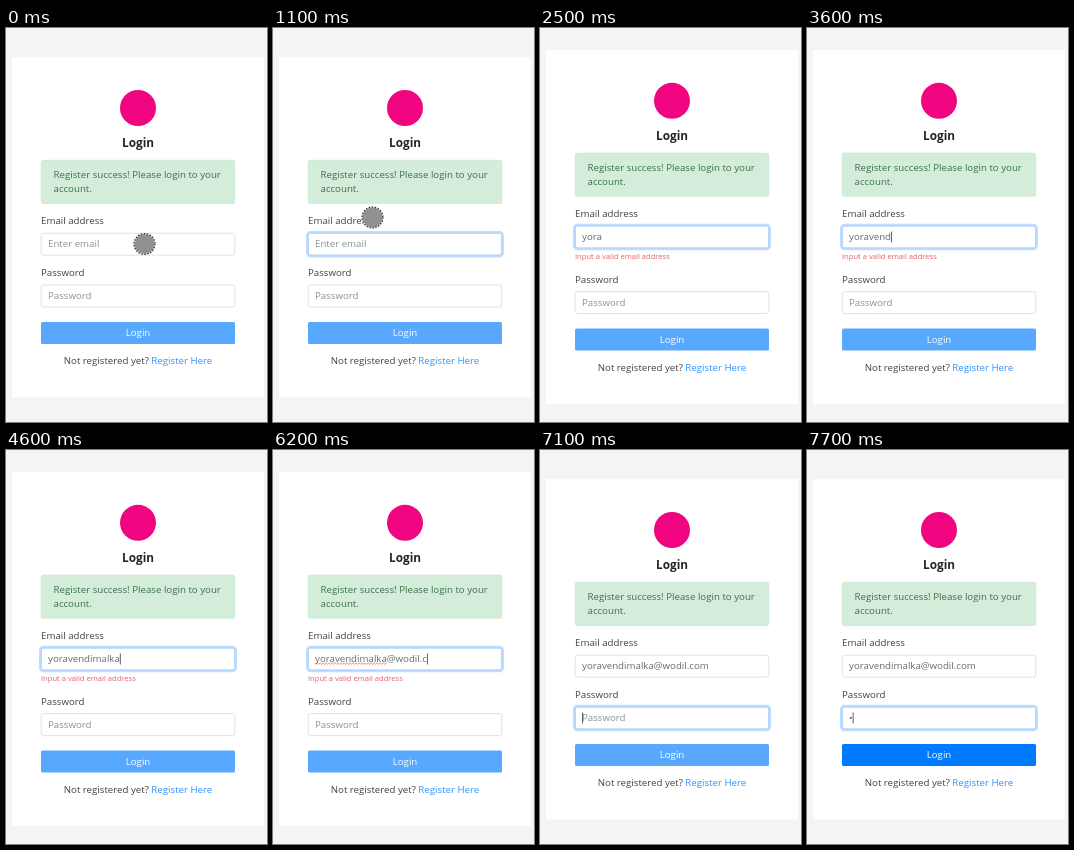
An HTML page that plays this animation: 261 px wide and 394 px high, repeating every 8000 ms.

```html
<!DOCTYPE html>
<html lang="en">
<head>
<meta charset="utf-8">
<title>Login</title>
<style>
html, body { margin: 0; height: 100%; overflow: hidden; background: #f4f4f4; }
svg { display: block; width: 100vw; height: 100vh; font: 9.7px "Open Sans", sans-serif; fill: #3f4347; }
.field { fill: #fff; stroke: #dfe2e6; }
.focus { fill: none; stroke: #a3cfff; }
.ring { fill: none; stroke: #bfdeff; stroke-width: 2; }
.hint { fill: #8b9299; }
.value { fill: #666c72; }
.caret { stroke: #343a40; stroke-width: .8; }
.mid { text-anchor: middle; }
</style>
</head>
<body>
<svg viewBox="0 0 261 394">
  <rect id="card" x="6" width="252" fill="#fff"/>
  <g id="upper">
    <circle cx="132" cy="80" r="18" fill="#f0047f"/>
    <text class="mid" x="132" y="119" font-size="11.8" font-weight="700" fill="#212529">Login</text>
    <rect x="35.2" y="132.3" width="193.6" height="43.2" rx="2" fill="#d4edda" stroke="#c8e8d0" stroke-width=".7"/>
    <text x="47.5" y="150" fill="#3a7148">Register success! Please login to your</text>
    <text x="47.5" y="164" fill="#3a7148">account.</text>
    <text x="35" y="196">Email address</text>
    <g id="email"></g>
    <path id="squiggle" fill="none" stroke="#e5484d" stroke-width=".7"/>
  </g>
  <text id="error" x="35" y="231" font-size="7.6" fill="#e4606d">Input a valid email address</text>
  <g id="lower">
    <text x="35" y="248">Password</text>
    <g id="password"></g>
    <g id="button">
      <rect x="35" y="294" width="194" height="22" rx="1.5" fill="#007bff"/>
      <text class="mid" x="132" y="308" fill="#fff">Login</text>
    </g>
    <text class="mid" x="132" y="336">Not registered yet? <tspan fill="#2e93ff">Register Here</tspan></text>
  </g>
  <g id="pointer">
    <circle r="10.6" fill="#919191" stroke="#e4e4e4" stroke-width="1.4"/>
    <circle r="10.4" fill="none" stroke="#222" stroke-width="1.2" stroke-dasharray="1.3 1.7"/>
  </g>
</svg>
<script>
const $ = id => document.getElementById(id);
const clamp = v => Math.max(0, Math.min(1, v));
const show = (el, on) => el.style.display = on ? '' : 'none';

const address = 'yoravendimalka@wodil.com';
// time at which each character of the address appears
const keys = [1400, 1600, 2000, 2100, 3200, 3300, 3400, 3600, 3800, 3900, 4000, 4200,
  4400, 4600, 5000, 5200, 5400, 5500, 5600, 5900, 6100, 6200, 6400, 6600];

function makeField(id, y, hint) {
  const g = $(id);
  g.innerHTML = `<rect class="field" x="35.2" y="${y}" width="193.6" height="22" rx="2.5"/>
    <g class="glow"><rect class="ring" x="34" y="${y - 1.2}" width="196" height="24.4" rx="3.5"/>
    <rect class="focus" x="35.2" y="${y}" width="193.6" height="22" rx="2.5"/></g>
    <text class="hint" x="42" y="${y + 14}">${hint}</text>
    <text class="value" x="42" y="${y + 14}"></text>
    <path class="caret" d="M42.5 ${y + 5.5}v11"/>`;
  const part = name => g.querySelector('.' + name);
  return (text, focus, caret) => {
    const value = part('value');
    value.textContent = text;
    show(part('hint'), !text);
    part('glow').style.opacity = focus;
    show(part('caret'), caret);
    const width = text ? value.getComputedTextLength() : 0;
    part('caret').setAttribute('transform', `translate(${width})`);
  };
}
const setEmail = makeField('email', 205.2, 'Enter email');
const setPassword = makeField('password', 257, 'Password');
$('squiggle').setAttribute('d', 'M42 220.8' + 'q.75 1.4 1.5 0t1.5 0'.repeat(24));

function pointerAt(t) {
  if (t < 1000) return [138.5, 216];
  if (t < 1100) return [119, 201];
  if (t < 1400) return [99.5, 189.5];
  if (t >= 2400 && t < 2500) return [229, 172];
}

function draw(t) {
  const invalid = t >= 1400 && t < 6400;
  const rise = invalid ? 7.2 : 0, drop = invalid ? 6.6 : 0;
  $('card').setAttribute('y', 29.2 - rise);
  $('card').setAttribute('height', 340.3 + rise + drop);
  $('upper').setAttribute('transform', `translate(0 ${-rise})`);
  $('lower').setAttribute('transform', `translate(0 ${drop})`);
  show($('error'), invalid);

  const typed = keys.filter(k => k <= t).length;
  const leave = clamp((t - 6800) / 300);
  const caret = t >= 600 && t < 1000 || t >= 1400 && t < 2500 || t >= 3100 && t < 6900;
  setEmail(address.slice(0, typed), clamp((t - 500) / 300) - leave, caret);
  show($('squiggle'), t >= 5000 && t < 6900);

  const filled = t >= 7700;
  setPassword(filled ? '•' : '', leave, t >= 6900 && t < 7400 || filled);
  $('button').style.opacity = filled ? 1 : .65;

  const pos = pointerAt(t);
  show($('pointer'), pos);
  if (pos) $('pointer').setAttribute('transform', `translate(${pos})`);
}

const start = performance.now();
function tick() {
  const t = (performance.now() - start) % 8000;
  draw(Math.floor(t / 100) * 100); // ten pictures a second
  requestAnimationFrame(tick);
}
tick();
</script>
</body>
</html>
```
